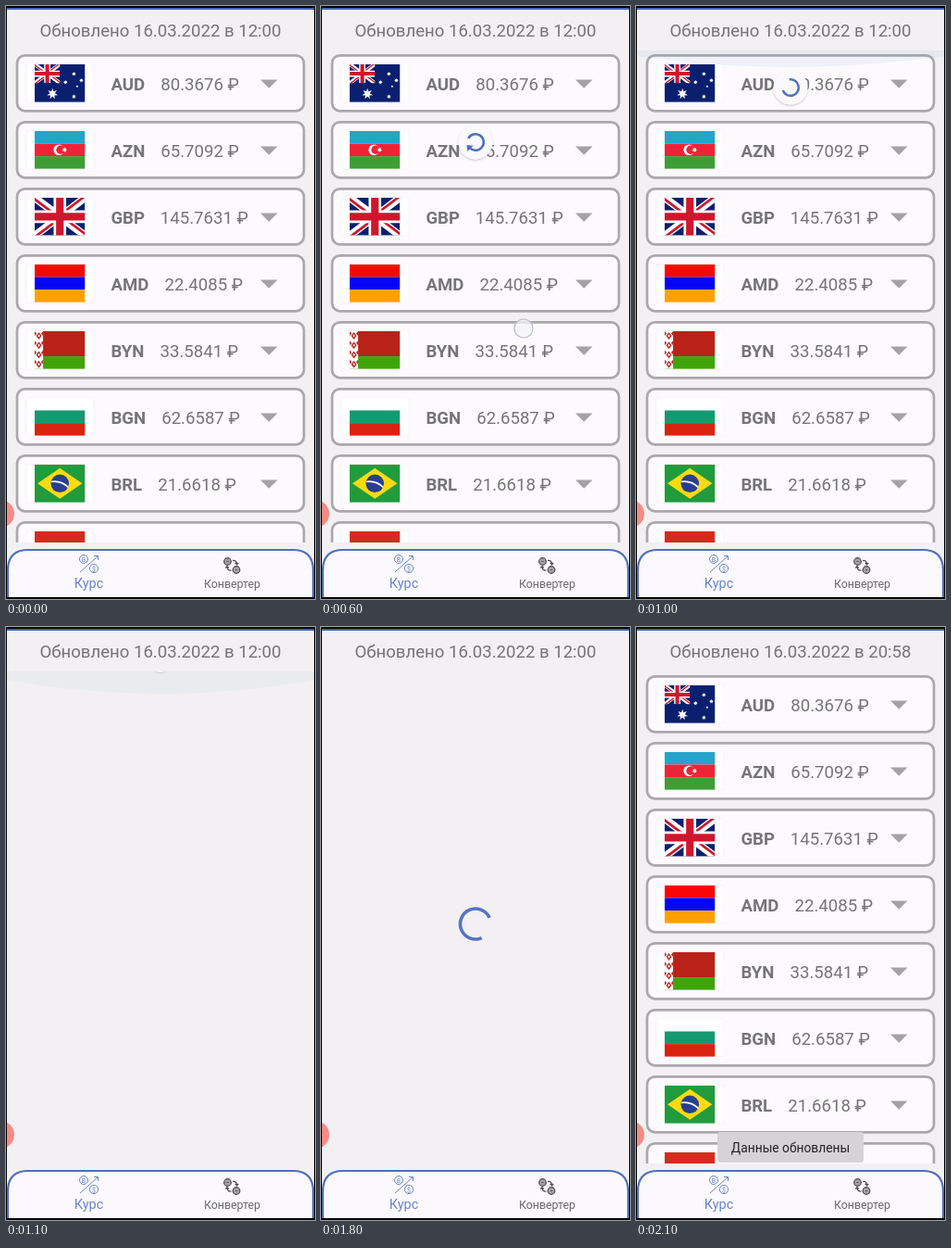
Write an HTML page that moves like this. It is 334 px wide and 640 px high and loops after 2900 ms.

```html
<!DOCTYPE html>
<html lang="ru">
<head>
<meta charset="utf-8">
<title>Курс валют</title>
<style>
  html, body { margin: 0; width: 100%; height: 100%; overflow: hidden; background: #000; }
  svg { display: block; }
  #stage { width: 334px; height: 640px; font-family: Roboto, "Noto Sans", sans-serif; }
</style>
</head>
<body>
<svg id="stage" viewBox="0 0 334 640">
  <defs>
    <clipPath id="screen"><rect x="1" y="2" width="332" height="636"/></clipPath>
    <clipPath id="listArea"><rect x="1" y="48" width="332" height="531"/></clipPath>
    <clipPath id="jackHalves"><path d="M20 15h20v15zv15H0zH0V0zV0h20z"/></clipPath>
    <filter id="shadow" x="-30%" y="-30%" width="160%" height="160%">
      <feDropShadow dx="0" dy="1" stdDeviation="1.2" flood-color="#000" flood-opacity=".25"/>
    </filter>
    <symbol id="jack" viewBox="0 0 40 30" preserveAspectRatio="none">
      <path d="M0 0h40v30H0z" fill="#0a1f6e"/>
      <path d="M0 0 40 30M40 0 0 30" stroke="#fff" stroke-width="6"/>
      <path d="M0 0 40 30M40 0 0 30" stroke="#d0162c" stroke-width="4" clip-path="url(#jackHalves)"/>
      <path d="M20 0v30M0 15h40" stroke="#fff" stroke-width="10"/>
      <path d="M20 0v30M0 15h40" stroke="#d0162c" stroke-width="6"/>
    </symbol>
  </defs>
  <g clip-path="url(#screen)">
    <rect width="334" height="640" fill="#f2f0f2"/>
    <rect y="2" width="334" height="2" fill="#4766b4"/>
    <text id="updated" x="167" y="33.4" font-size="18.6" text-anchor="middle" fill="#757477"></text>
    <g clip-path="url(#listArea)">
      <g id="list"></g>
      <path id="glow" fill="#5a9bbd"/>
      <g id="pull">
        <circle r="18.5" fill="#faf9fb" filter="url(#shadow)"/>
        <path id="pullArc" fill="none" stroke="#4f6fc0" stroke-width="2.5"/>
        <path id="arrow" d="M-4.4 -1h8.8L0 4.6z" fill="#4f6fc0"/>
      </g>
    </g>
    <path id="loader" fill="none" stroke="#5673c4" stroke-width="3.6"/>
    <circle cx="-6" cy="548" r="15" fill="#f68b85"/>
    <path d="M2 641V609Q2 587 24 587H310Q332 587 332 609V641" fill="#fbf9fd" stroke="#5170ba" stroke-width="2.2"/>
    <g fill="none" stroke="#6784cc" stroke-width="1">
      <path d="M80 611 99 594M95 593.5h4.5v4.5"/>
      <circle cx="84" cy="597" r="4.5"/><circle cx="95" cy="607" r="4.6" fill="#fbf9fd"/>
    </g>
    <g font-size="7" text-anchor="middle" fill="#6784cc">
      <text x="84" y="599.5">B</text><text x="95" y="609.5">$</text>
    </g>
    <g fill="#a5a3a7" stroke="#4a494c" stroke-width="1.2">
      <circle cx="239.5" cy="599.5" r="3.8"/><circle cx="249" cy="608.5" r="3.8"/>
      <path fill="none" d="M245 598.5q4.500 -.5 4.500 4M247.800 601l1.700 1.800 1.700 -1.800M243.500 609q-4.500 .5 -4.500 -4M237.300 606.500l1.700 -1.800 1.700 1.800"/>
      <path fill="none" stroke-width=".9" d="M238.300 599.500h2.400M247.800 608.500h2.400"/>
    </g>
    <text x="89.500" y="628" font-size="14.500" text-anchor="middle" fill="#6784cc">Курс</text>
    <text x="244.500" y="628" font-size="12.400" text-anchor="middle" fill="#69686b">Конвертер</text>
    <circle id="touch" r="10" fill="#f6f5f9" fill-opacity=".75" stroke="#b9bcc9" stroke-width="1.200"/>
    <g id="toast">
      <rect x="88" y="545" width="158" height="33" rx="3" fill="#d5d3d6"/>
      <text x="167" y="566.800" font-size="13.800" text-anchor="middle" fill="#242326">Данные обновлены</text>
    </g>
  </g>
</svg>
<script>
const $ = id => document.getElementById(id);
const rect = (x, y, w, h, fill) => `<rect x="${x}" y="${y}" width="${w}" height="${h}" fill="${fill}"/>`;
const polar = (r, deg) => [r * Math.cos(deg * Math.PI / 180), r * Math.sin(deg * Math.PI / 180)];

function star(cx, cy, r, points) {
  const pts = Array.from({ length: points * 2 }, (_, i) => {
    const [x, y] = polar(i % 2 ? r * 0.45 : r, i * 180 / points - 90);
    return (cx + x).toFixed(2) + ',' + (cy + y).toFixed(2);
  });
  return `<polygon points="${pts.join(' ')}" fill="#fff"/>`;
}

// Flags are drawn in a 54 × 41 box.
const W = 54, H = 41;
const bands = (...colors) => colors.map((c, i) =>
  rect(0, i * H / colors.length, W, H / colors.length, c)).join('');

function ornament() {
  let d = '';
  for (let y = 0; y < 4; y++) {
    const m = y * 10.25 + 5.1;
    d += `M4.5 ${m - 4}l3 4-3 4-3-4zM0 ${m - 5}l2.200 2.500L0 ${m}zM9 ${m - 5}l-2.200 2.500L9 ${m}z`;
    d += `M4.500 ${m - 1.6}l-1.200 1.600 1.200 1.600 1.200-1.600z`;
  }
  return rect(0, 0, 9, H, '#fff') + `<path d="${d}" fill="#bd2a27" fill-rule="evenodd"/>`;
}

const flags = {
  AUD: rect(0, 0, W, H, '#0a1f6e') + '<use href="#jack" width="27" height="20.500"/>' +
    star(19, 32, 6, 7) + star(42, 10.500, 2.500, 7) + star(33, 19.500, 2.500, 7) +
    star(50, 17.500, 2.500, 7) + star(42, 35, 2.500, 7) + star(45.500, 24, 1.500, 5),
  AZN: bands('#26a3cb', '#ee2436', '#3f9d35') +
    '<circle cx="26" cy="20.500" r="5.800" fill="#fff"/><circle cx="27.800" cy="20.500" r="4.700" fill="#ee2436"/>' +
    star(32, 20.500, 3, 8),
  GBP: '<use href="#jack" width="54" height="41"/>',
  AMD: bands('#f90505', '#0505f5', '#ffa000'),
  BYN: rect(0, 0, W, 27.300, '#b92219') + rect(0, 27.300, W, 13.700, '#3fa40a') + ornament(),
  BGN: bands('#fff', '#159a70', '#d9230f'),
  BRL: rect(0, 0, W, H, '#219b3c') + '<path d="M27 4 51 20.500 27 37 3 20.500z" fill="#fadb10"/>' +
    '<circle cx="27" cy="20.500" r="9.700" fill="#273f91"/>' +
    '<path d="M18 18.500q10 -1.500 18 6" fill="none" stroke="#fff" stroke-width="1.700"/>',
  last: rect(0, 0, W, H, '#d52b1e')
};

const rates = [
  ['AUD', '80.3676', 167.3], ['AZN', '65.7092', 167.3], ['GBP', '145.7631', 166.8],
  ['AMD', '22.4085', 171.5], ['BYN', '33.5841', 166.5], ['BGN', '62.6587', 168.2],
  ['BRL', '21.6618', 164.3], ['last']
];

$('list').innerHTML = rates.map(([code, value, x], i) => `
  <g transform="translate(0 ${52 + 72 * i})">
    <rect x="12" y="1.300" width="310" height="60" rx="8.500" fill="#fcfafd" stroke="#a9a8ab" stroke-width="2.700"/>
    <rect x="22" y="10" width="73" height="42" rx="4" fill="#fff" stroke="#f3f1f4" stroke-width=".8"/>
    <svg x="31" y="10.800" width="54.500" height="41" viewBox="0 0 54 41" preserveAspectRatio="none">${flags[code]}</svg>
    ${value ? `<g font-size="18.600" fill="#757477">
      <text x="113.400" y="38.700" font-weight="700">${code}</text>
      <text x="${x}" y="38.700">${value} ₽</text></g>
    <path d="M275 27.500h18.500l-9.250 9.300z" fill="#a3a2a5"/>` : ''}
  </g>`).join('');

function arc(cx, cy, r, start, sweep) {
  const [x0, y0] = polar(r, start), [x1, y1] = polar(r, start + sweep);
  return `M${cx + x0} ${cy + y0}A${r} ${r} 0 ${sweep > 180 ? 1 : 0} 1 ${cx + x1} ${cy + y1}`;
}

// Solves cubic-bezier(.4, 0, .2, 1) for progress p.
function fastOutSlowIn(p) {
  if (p <= 0 || p >= 1) return Math.min(1, Math.max(0, p));
  let lo = 0, hi = 1, u = 0.5;
  for (let i = 0; i < 24; i++) {
    u = (lo + hi) / 2;
    const x = 1.2 * u * (1 - u) ** 2 + 0.6 * u * u * (1 - u) + u ** 3;
    if (x < p) lo = u; else hi = u;
  }
  return 3 * u * u * (1 - u) + u ** 3;
}

// step: [centre y, arc start, arc sweep, arrow size, scale]
const pullSteps = {
  2: [32, -60, 0, 0, 1], 3: [56, -56, 44, 0, 1], 4: [90, 27, 288, 1, 1],
  5: [124, 135, 288, 1, 1], 6: [147, 207, 288, 1, 1], 7: [140, 207, 288, 1, 1],
  8: [105, 207, 288, 1, 1], 9: [89, 232, 275, 0, 1], 10: [88, 262, 258, 0, 1],
  11: [38, 285, 240, 0, 0.6]
};
// step: [x, y]
const touchSteps = { 1: [223, 136], 2: [223, 160], 3: [222, 194], 4: [221, 246], 5: [220, 302], 6: [219, 348] };
// step: [depth at edges, depth in the middle, opacity]
const glowSteps = { 9: [3, 9, 0.05], 10: [6, 18, 0.08], 11: [9, 24, 0.06], 12: [6, 16, 0.03] };

const show = (id, on) => $(id).setAttribute('display', on ? 'inline' : 'none');

function drawPull(p) {
  show('pull', p);
  if (!p) return;
  const [y, start, sweep, head, scale] = p, end = start + sweep, [ax, ay] = polar(8.8, end);
  $('pull').setAttribute('transform', `translate(167 ${y}) scale(${scale})`);
  $('pullArc').setAttribute('d', sweep ? arc(0, 0, 8.8, start, sweep) : '');
  $('arrow').setAttribute('transform', `translate(${ax} ${ay}) rotate(${end}) scale(${head})`);
}

function drawLoader(ms) {
  const grow = fastOutSlowIn(ms / 666.5), shrink = fastOutSlowIn((ms - 666.5) / 666.5);
  const start = -90 + 90 * ms / 1333 + 720 * ms / 4444 + 270 * shrink;
  $('loader').setAttribute('d', arc(167, 320.500, 16.500, start, Math.max(2, 270 * (grow - shrink))));
}

function draw(step) {
  const loading = step >= 12 && step <= 18;
  show('list', step < 11 || step > 18);
  $('updated').textContent = 'Обновлено 16.03.2022 в ' + (step > 18 ? '20:58' : '12:00');
  drawPull(pullSteps[step]);

  const touch = touchSteps[step];
  show('touch', touch);
  if (touch) $('touch').setAttribute('transform', `translate(${touch})`);

  const glow = glowSteps[step];
  show('glow', glow);
  if (glow) {
    const [edge, mid, alpha] = glow;
    $('glow').setAttribute('d', `M0 48H334V${48 + edge}Q167 ${48 + 2 * mid - edge} 0 ${48 + edge}z`);
    $('glow').setAttribute('opacity', alpha);
  }

  show('loader', loading);
  if (loading) drawLoader(step * 100 - 1120);
  show('toast', step > 19);
  $('toast').setAttribute('opacity', step === 20 ? 0.5 : 1);
}

const begin = performance.now();
let shown = -1;
function tick() {
  const step = Math.min(21, Math.floor((performance.now() - begin) % 2900 / 100));
  if (step !== shown) draw(shown = step);
  requestAnimationFrame(tick);
}
tick();
</script>
</body>
</html>
```
